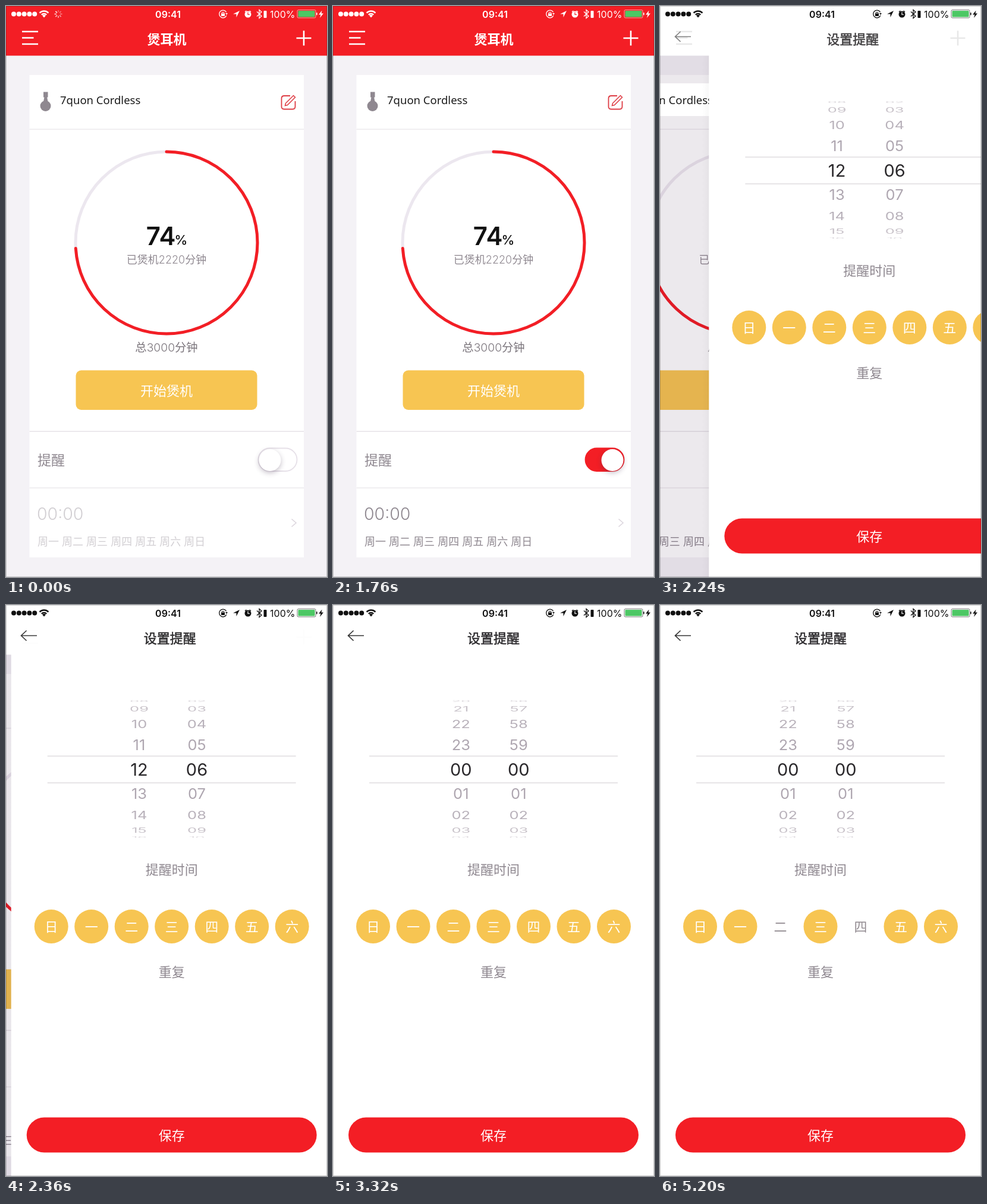
An HTML page with a canvas that plays this animation: 540x960 px, repeating every 5240 ms.

```html
<!DOCTYPE html>
<html lang="zh">
<head>
<meta charset="utf-8">
<style>
  html, body { margin: 0; width: 540px; height: 960px; overflow: hidden; background: #fff; }
  canvas { display: block; }
</style>
</head>
<body>
<canvas id="stage" width="540" height="960"></canvas>
<script>
const ctx = document.getElementById('stage').getContext('2d');
const LOOP = 5240, TICK = 40, TAU = Math.PI * 2;
const RED = '#f31e25', YELLOW = '#f7c552', GREY = '#8f8890', DARK = '#2b292c', LINE = '#ece9ed';
const FONT = 'Inter, "Noto Sans CJK SC", "Noto Sans CJK", sans-serif';
const DAYS = [...'日一二三四五六'];

const clamp = v => Math.max(0, Math.min(1, v));
const ease = v => (v = clamp(v), v * v * (3 - 2 * v));
// Remaining distance of a critically damped spring, 1 down to 0
const spring = (ms, w) => {
  const x = Math.max(0, ms) / 1000 * w;
  return (1 + x) * Math.exp(-x);
};

// y is the visual middle of the glyphs
function text(str, x, y, size, color, weight = 400, align = 'center', family = FONT) {
  ctx.font = `${weight} ${size}px ${family}`;
  ctx.textAlign = align;
  ctx.fillStyle = color;
  ctx.fillText(str, x, y + size * 0.37);
}
function rect(x, y, w, h, color, r = 0) {
  ctx.fillStyle = color;
  ctx.beginPath();
  ctx.roundRect(x, y, w, h, r);
  ctx.fill();
}
function disc(x, y, r, color) {
  ctx.fillStyle = color;
  ctx.beginPath();
  ctx.arc(x, y, r, 0, TAU);
  ctx.fill();
}
function arc(x, y, r, from, to, color, width) {
  ctx.strokeStyle = color;
  ctx.lineWidth = width;
  ctx.beginPath();
  ctx.arc(x, y, r, from, to);
  ctx.stroke();
}
function path(d, color, width) {
  const p = new Path2D(d);
  if (width) {
    ctx.strokeStyle = color;
    ctx.lineWidth = width;
    ctx.stroke(p);
  } else {
    ctx.fillStyle = color;
    ctx.fill(p);
  }
}
function group(draw, alpha = 1) {
  ctx.save();
  ctx.globalAlpha *= alpha;
  draw();
  ctx.restore();
}

function statusBar(color, t, busy) {
  for (let i = 0; i < 5; i++) disc(13 + i * 8.8, 13.5, 4, color);
  for (const r of [6, 10.5]) arc(64, 19, r, -2.36, -0.78, color, 2.4);
  path('M64 19.5L61 16A4.5 4.5 0 0 1 67 16Z', color);
  if (busy) {
    const step = Math.floor(t / 100);
    for (let i = 0; i < 8; i++) group(() => {
      ctx.translate(88, 13.5);
      ctx.rotate(i * TAU / 8);
      path('M0 -3V-6.5', color, 1.6);
    }, 0.3 + 0.6 * ((i - step % 8 + 8) % 8) / 7);
  }
  text('09:41', 272.5, 14, 16, color, 600);

  arc(365, 13.5, 6.3, 0.4, 5.8, color, 1.3);
  rect(362, 12.5, 6, 4.5, color);
  arc(365, 12.5, 2, Math.PI, TAU, color, 1.2);
  path('M369 12H373L371 15Z', color);
  path('M393 8L382 13.5H387.5V19Z', color);
  disc(407, 14, 5.5, color);
  path('M402 10L404.5 8M412 10L409.5 8', color, 1.5);
  path('M407 10.5V14.5H410', color === '#fff' ? RED : '#fff', 1.2);
  path('M422 9.5L430 17L426 20.5V6.5L430 10L422 17.5', color, 1.3);
  rect(433.5, 8, 5, 12, color, 1);
  text('100%', 486.5, 14, 16, color, 400, 'right');
  ctx.globalAlpha = 0.55;
  path('M492 6.5H519Q521 6.5 521 8.5V18Q521 20 519 20H492Q490 20 490 18V8.5Q490 6.5 492 6.5Z', color, 1);
  ctx.globalAlpha = 1;
  rect(491.5, 8, 28, 10.5, '#4cc764', 1);
  rect(522, 11, 1.6, 4.5, color, 1);
  path('M531.5 7.5L526 14.5H529.5L528 20L534 12.5H530.5Z', color);
}

function menuIcons(color) {
  path('M27 43H54M27 53.5H46.5M27 64H54', color, 2.4);
  path('M488.5 54H513.5M501 41.5V66.5', color, 2.6);
}

// Regular glyphs with a hairline outline give a medium weight
function title(x) {
  text('设置提醒', x, 55.5, 22, DARK);
  ctx.strokeStyle = DARK;
  ctx.lineWidth = 0.5;
  ctx.strokeText('设置提醒', x, 55.5 + 22 * 0.37);
}

function toggle(k) {
  ctx.beginPath();
  ctx.roundRect(424.5, 743.5, 65, 38.5, 19.25);
  group(() => { ctx.fillStyle = RED; ctx.fill(); }, k);
  ctx.lineWidth = 1.8;
  ctx.strokeStyle = k > 0.5 ? RED : '#e6e0e8';
  ctx.stroke();
  group(() => {
    ctx.shadowColor = 'rgba(60,40,70,.3)';
    ctx.shadowBlur = 8;
    ctx.shadowOffsetY = 3;
    disc(444 + 26 * k, 763.5, 18.5, '#fff');
  });
}

function home(k, done) {
  rect(0, 83, 540, 877, '#f4f2f6');
  rect(39.5, 116, 461.5, 811, '#fff');
  for (const y of [207, 715, 810]) rect(39.5, y - 0.5, 461.5, 1.5, y === 715 ? '#e6e2e7' : LINE);

  rect(63, 144.5, 7.5, 9, GREY);
  path('M64.5 153H69L70.5 161H63Z', GREY);
  disc(66.5, 168, 9, GREY);
  path('M478 151H468Q463.5 151 463.5 155.5V169Q463.5 173.5 468 173.5H482Q486.5 173.5 486.5 169V160', '#de3d45', 1.8);
  path('M470.5 163.5L483.5 150.5L486.5 153.5L473.5 166.5L469.5 167.5Z', '#de3d45', 1.5);

  ctx.lineCap = 'round';
  arc(270, 398, 153, 0, TAU, '#ece7ef', 5);
  arc(270, 398, 153, -TAU / 4, TAU * (0.74 - 0.25), RED, 5);
  ctx.lineCap = 'butt';
  text('74', 260.5, 386, 42, '#111', 600);
  text('%', 294.5, 392.5, 22, '#111', 500);
  text('已煲机2220分钟', 270, 426, 18, GREY, 300);
  text('总3000分钟', 270, 573.5, 19.3, '#7b757c', 300);
  rect(117.5, 612.5, 305, 66.5, YELLOW, 9);
  text('开始煲机', 270, 647, 22, '#fff', 300);

  text('提醒', 53, 763.5, 23, GREY, 400, 'left');
  toggle(k);
  group(() => {
    text('00:00', 52, 853, 28.5, GREY, 300, 'left');
    text('周一 周二 周三 周四 周五 周六 周日', 53, 900.5, 18, GREY, 300, 'left');
  }, 0.4 + 0.6 * k);
  path('M480.5 862.5L488 869L480.5 875.5', '#dcd6de', 1.6);

  rect(0, 83, 720, 877, `rgba(36,0,50,${0.1 * done})`);
  if (done < 0.9) {
    rect(90, 130, 144, 55, '#fff');
    text('7quon Cordless', 91, 158.5, 18.5, '#1b1b1b', 400, 'left', '"Noto Sans", sans-serif');
  }
}

// One drum of the time picker; pos is the fractional value at the middle
function drum(x, pos, count, inBand) {
  for (let n = Math.ceil(pos - 4.3); n <= pos + 4.3; n++) {
    const angle = (n - pos) * 0.363, flat = Math.cos(angle);
    const label = String((n + count) % count).padStart(2, '0');
    group(() => {
      ctx.translate(x, 276.5 + 115 * Math.sin(angle));
      ctx.scale(1, Math.max(0.06, flat));
      text(label, 0, 0, inBand ? 29 : 25.5, inBand ? DARK : '#aaa2ac', 400);
    }, inBand ? 1 : 0.35 + 0.65 * flat);
  }
}
function picker(left) {
  const bands = [[160, 94, false], [254, 45, true], [299, 92, false]];
  for (const [y, h, inBand] of bands) group(() => {
    ctx.beginPath();
    ctx.rect(61, y, 418, h);
    ctx.clip();
    drum(215.3, 12 * left, 24, inBand);
    drum(312.3, 6 * left, 60, inBand);
  });
  for (const y of [253.5, 298.5]) rect(61, y, 418, 1, '#cfcbd0');
}

function reminder(t) {
  rect(0, 83, 540, 877, '#fff');
  picker(spring(t - 2390, 14.8));
  text('提醒时间', 270, 444.5, 22, GREY, 300);
  const pressedAt = { 2: 3880, 4: 4540 };
  DAYS.forEach((day, i) => {
    const x = 67.5 + 67.5 * i, since = t - (pressedAt[i] ?? LOOP);
    if (since < 160) disc(x, 540.5, 28.5, since < 0 ? YELLOW : '#928b91');
    text(day, x, 541, 22, since < 0 ? '#fff' : '#928b91', 300);
  });
  text('重复', 270, 616.5, 22, GREY, 300);
  rect(26, 861.5, 488, 59, RED, 29.5);
  text('保存', 270, 892, 22, '#fff', 400);
}

function draw(t) {
  const pushed = t >= 2092;
  const rest = spring(t - 2093, 22.8), done = 1 - rest;
  ctx.clearRect(0, 0, 540, 960);

  if (rest > 0.001) group(() => {
    ctx.translate(-162 * done, 0);
    home(ease((t - 1300) / 250), done);
  });
  if (pushed) group(() => {
    ctx.translate(540 * rest, 0);
    const shade = ctx.createLinearGradient(-12, 0, 0, 0);
    shade.addColorStop(0, 'rgba(0,0,0,0)');
    shade.addColorStop(1, `rgba(0,0,0,${0.18 * rest})`);
    rect(-12, 83, 12, 877, shade);
    reminder(t);
  });

  rect(0, 0, 540, 83.5, pushed ? '#fff' : RED);
  if (pushed) {
    group(() => menuIcons('#444'), rest * 0.8);
    group(() => title(270 + 356 * rest), Math.pow(done, 0.8));
    group(() => path('M52 51.5H25.5M34.5 43L25.5 51.5L34.5 60', '#333', 1.7), clamp((done - 0.6) / 0.4));
  } else {
    menuIcons('#fff');
    text('煲耳机', 270.5, 55.5, 22, '#fff', 600);
  }
  statusBar(pushed ? '#111' : '#fff', t, t < 700);

  ctx.strokeStyle = 'rgba(0,0,0,.18)';
  ctx.lineWidth = 1;
  ctx.strokeRect(0.5, 0.5, 539, 959);
}

// The picture advances at 25 steps a second
function frame() {
  const t = performance.now() % LOOP;
  draw(Math.floor(t / TICK) * TICK);
  requestAnimationFrame(frame);
}
frame();
</script>
</body>
</html>
```
